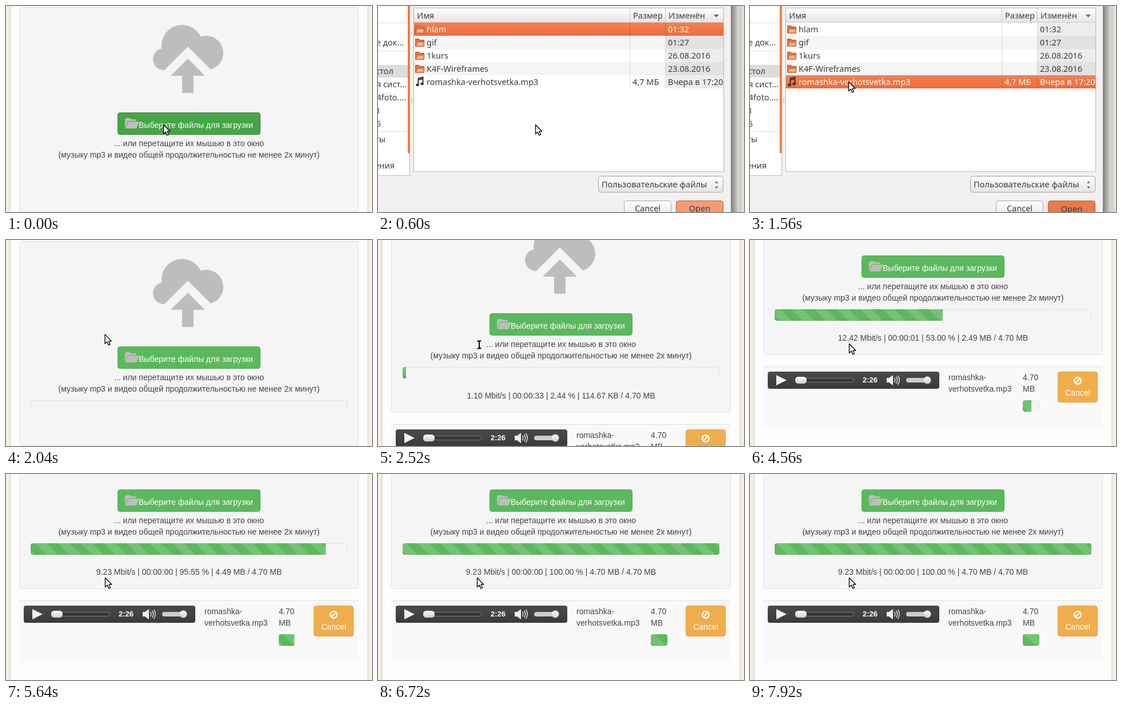
Recreate the animation shown at these times as an HTML page. Size 640x360 px, loop 8000 ms.

```html
<!DOCTYPE html>
<html lang="ru">
<head>
<meta charset="utf-8">
<title>Загрузка файлов</title>
<style>
  html, body { margin: 0; width: 100%; height: 100%; overflow: hidden; background: #f5f0e4; }
  svg { display: block; width: 640px; height: 360px; }
  text { font: 14px "Liberation Sans", Arial, sans-serif; fill: #444; white-space: pre; }
  .mid { text-anchor: middle; }
  .end { text-anchor: end; }
  .white { fill: #fff; }
  #dialog text { font: 14.5px "Noto Sans", sans-serif; fill: #3c3c3c; }
  #dialog .selected text { fill: #fff; }
  .button { fill: url(#face); stroke: #aaa59f; }
</style>
</head>
<body>
<svg viewBox="0 0 640 360">
  <defs>
    <pattern id="stripes" width="40" height="40" patternUnits="userSpaceOnUse">
      <path d="M0 0H20L40 20V40ZM0 20V40H20Z" fill="#fff" fill-opacity=".15"/>
    </pattern>
    <linearGradient id="face" x2="0" y2="1">
      <stop stop-color="#fff"/><stop offset="1" stop-color="#e6e4e2"/>
    </linearGradient>
    <linearGradient id="knob" x2="0" y2="1">
      <stop stop-color="#fff"/><stop offset="1" stop-color="#ccc"/>
    </linearGradient>
    <linearGradient id="orange" x2="0" y2="1">
      <stop stop-color="#f58052"/><stop offset="1" stop-color="#ec6c3c"/>
    </linearGradient>
    <linearGradient id="edge">
      <stop stop-color="#000" stop-opacity=".5"/><stop offset=".6" stop-color="#000" stop-opacity=".14"/>
      <stop offset="1" stop-color="#000" stop-opacity=".04"/>
    </linearGradient>
    <linearGradient id="dark" x2="0" y2="1">
      <stop stop-color="#4a4a4a"/><stop offset="1" stop-color="#3a3a3a"/>
    </linearGradient>
  </defs>

  <rect width="640" height="360" fill="#f5f0e4"/>
  <rect x="5.5" y="-5" width="629" height="370" fill="none" stroke="#ece7dc" stroke-width="2"/>
  <rect x="7.5" y="-5" width="625" height="370" fill="#fdfdfd" stroke="#dad7d0"/>

  <g id="page">
    <rect x="23.5" y="2.5" width="593" height="357" rx="4" fill="#f5f5f5" stroke="#e1e1e1"/>
    <path d="M26 3.5H614" stroke="#ececec"/>
    <g fill="#bdbdbd">
      <circle cx="276" cy="93" r="19"/><circle cx="308" cy="69" r="36"/><circle cx="350" cy="82" r="30"/>
      <path d="M276 112L280 70H345L352 112Z"/>
      <path d="M318 71L275 114H361Z" fill="#f5f5f5"/>
      <path d="M318 92L348 122H328V152H308V122H288Z"/>
    </g>
    <rect id="choose" x="195.5" y="186.5" width="249" height="38" rx="4"/>
    <path d="M208 212V198L210 196H217L219 198H227V201H213L209 212ZM213.500 202H233L228 214H209Z" fill="#bdbdbd"/>
    <text class="white" x="232" y="213">Выберите файлы для загрузки</text>
    <text class="mid" x="320" y="245">... или перетащите их мышью в это окно</text>
    <text class="mid" x="320" y="265">(музыку mp3 и видео общей продолжительностью не менее 2х минут)</text>
    <g id="progress">
      <g id="mainBar"></g>
      <text id="stats" class="mid" x="320" y="335"></text>
    </g>

    <rect x="23" y="380" width="593" height="107" fill="#f9f9f9"/>
    <path d="M23 380.500H616" stroke="#ddd"/>
    <rect x="31" y="389" width="300" height="30" rx="4" fill="url(#dark)"/>
    <path d="M46 395L64 404L46 413Z" fill="#f2f2f2"/>
    <rect x="80.500" y="400.500" width="101" height="7" rx="3.500" fill="#383838" stroke="#777"/>
    <rect x="79" y="398" width="20" height="12" rx="5.500" fill="url(#knob)"/>
    <text class="white" x="197" y="408" style="font-size:13px;font-weight:bold">2:26</text>
    <path d="M239 400H243L250 395V413L243 408H239Z" fill="#eee"/>
    <path d="M252.500 400Q255 404 252.500 408M255.500 398Q260 404 255.500 410M258.500 396Q264 404 258.500 412" fill="none" stroke="#ddd" stroke-width="1.500"/>
    <rect x="273" y="400" width="42" height="8" rx="4" fill="#ccc"/>
    <circle cx="310" cy="404" r="6.500" fill="url(#knob)"/>
    <text x="347" y="404">romashka-</text>
    <text x="347" y="424">verhotsvetka.mp3</text>
    <text x="477" y="404">4.70</text>
    <text x="477" y="424">MB</text>
    <g id="smallBar"></g>
    <rect x="538.500" y="389.500" width="69" height="53" rx="4" fill="#f0ad4e" stroke="#eea236"/>
    <g fill="none" stroke="#fff" stroke-width="2.200"><circle cx="573" cy="405" r="5.800"/><path d="M569 409L577 401"/></g>
    <text class="mid white" x="573" y="431">Cancel</text>
  </g>

  <g id="dialog">
    <rect x="617" width="23" height="360" fill="url(#edge)"/>
    <rect width="617" height="360" fill="#f2f1f0"/>
    <rect x="-5" y="-5" width="60.500" height="301.500" fill="#fff" stroke="#bbb6b0"/>
    <rect y="103" width="52" height="22" fill="#dedcda"/>
    <path d="M0 29.500H52M0 78.500H52M0 219.500H52" stroke="#ddd"/>
    <rect x="52" width="3.500" height="257" fill="#f07746"/>
    <path d="M57 162.500H61M57 165.500H61M57 168.500H61" stroke="#bbb"/>
    <g id="places"></g>

    <rect x="62.500" y="3.500" width="542" height="286" fill="#fff" stroke="#bbb6b0"/>
    <rect x="63" y="4" width="541" height="25" fill="url(#face)"/>
    <path d="M63 28.500H604M440.500 4V28M502.500 4V28" stroke="#cfccc8"/>
    <text x="68" y="22">Имя</text><text x="446" y="22">Размер</text><text x="508" y="22">Изменён</text>
    <path d="M587 15H596L591.500 20Z" fill="#666"/>
    <g id="files"></g>

    <rect class="button" x="385.500" y="297.500" width="218" height="28" rx="4"/>
    <text x="391" y="317">Пользовательские файлы</text>
    <path d="M589 309.500L592 306L595 309.500ZM589 315.500L592 319L595 315.500Z" fill="#666"/>
    <rect class="button" x="430.500" y="340.500" width="82" height="30" rx="4"/>
    <text class="mid" x="471.500" y="359">Cancel</text>
    <rect id="open" x="521.500" y="340.500" width="82" height="30" rx="4" stroke="#c25a33"/>
    <text id="openLabel" class="mid" x="562.500">Open</text>
  </g>

  <g id="cursor" stroke-linejoin="round">
    <path id="arrow" d="M0 0V16L3.800 12.700L6.300 18.500L9 17.300L6.500 11.700H11.500Z" fill="#fff" stroke="#000" stroke-width="1.300"/>
    <path id="hand" d="M4 1Q6-1 7 1V7Q9 6 10 8Q12 7 13 9Q16 8 16 11V15L14 20H6L0 12Q0 9 4 12Z" fill="#fff" stroke="#000" stroke-width="1.200"/>
    <path id="beam" d="M0-5H7M3.500-5V8M0 8H7" fill="none" stroke="#000" stroke-width="2"/>
  </g>
</svg>
<script>
const $ = id => document.getElementById(id);
const LOOP = 8000, STEP = 120;

const updates = [
  { at: 2350, pct: 2.44, rate: '1.10', left: '00:00:33', sent: '114.67 KB' },
  { at: 2960, pct: 18.13, rate: '3.87', left: '00:00:07', sent: '851.86 KB' },
  { at: 3600, pct: 53, rate: '12.42', left: '00:00:01', sent: '2.49 MB' },
  { at: 4750, pct: 76.71, rate: '8.97', left: '00:00:00', sent: '3.61 MB' },
  { at: 5290, pct: 95.55, rate: '9.23', left: '00:00:00', sent: '4.49 MB' },
  { at: 5760, pct: 100, rate: '9.23', left: '00:00:00', sent: '4.70 MB' },
];

const files = [
  ['hlam', '', '01:32'], ['gif', '', '01:27'], ['1kurs', '', '26.08.2016'],
  ['K4F-Wireframes', '', '23.08.2016'],
  ['romashka-verhotsvetka.mp3', '4,7 МБ', 'Вчера в 17:20'],
];
const places = [
  ['е док…', 45, 69], ['стол', 27, 119], ['я сист…', 50, 142], ['4foto.…', 49, 165],
  ['3', 3, 188], ['5', 5, 211], ['ты', 13, 238], ['ения', 29, 284],
];

const folderIcon = y => `<path d="M65.500 ${y + 5.5}h6l1.500 2h7.500v11h-15z" fill="#e8703d" stroke="#b9532a"/>
  <path d="M68 ${y + 10.5}h13l-1 8h-14z" fill="#f6a071" stroke="#c85f33"/><path d="M70 ${y + 14.5}h7" stroke="#fff"/>`;
const noteIcon = y => `<path d="M70.500 ${y + 17}v-11.500l8-2v11.500M70.500 ${y + 8}l8-2" fill="none" stroke="#333" stroke-width="2"/>
  <ellipse cx="69" cy="${y + 17}" rx="2.800" ry="2.200" fill="#333"/><ellipse cx="77" cy="${y + 15}" rx="2.800" ry="2.200" fill="#333"/>`;

function fileRow([name, size, date], i) {
  const y = 29 + i * 23, odd = i % 2;
  return `<g>
    <rect x="63" y="${y}" width="541" height="23" fill="${odd ? '#f5f5f5' : '#fff'}"/>
    <rect x="503" y="${y}" width="101" height="23" fill="${odd ? '#e2e2e2' : '#ededed'}"/>
    <rect class="highlight" x="63" y="${y}" width="541" height="23" fill="url(#orange)"/>
    <path d="M440.500 ${y}v23M502.500 ${y}v23" stroke="#000" stroke-opacity=".13"/>
    ${size ? noteIcon(y) : folderIcon(y)}
    <text x="85" y="${y + 17}">${name}</text><text x="445" y="${y + 17}">${size}</text>
    <text x="507" y="${y + 17}">${date}</text></g>`;
}

function buildBar(id, x, y, width) {
  $(id).setAttribute('transform', `translate(${x} ${y})`);
  $(id).innerHTML = `<clipPath id="${id}Clip"><rect width="${width}" height="20" rx="4"/></clipPath>
    <g clip-path="url(#${id}Clip)"><rect width="${width}" height="20" fill="#f5f5f5"/>
    <rect x=".5" y=".5" width="${width - 1}" height="25" rx="4" fill="none" stroke="#e3e3e3"/>
    <rect class="fill" height="20" fill="#5cb85c"/><rect class="fill" height="20" fill="url(#stripes)"/>
    <rect class="fill" y="19" height="1" fill-opacity=".15"/></g>`;
  const fills = $(id).querySelectorAll('.fill');
  return pct => fills.forEach(f => f.setAttribute('width', Math.round(width * pct / 100)));
}

$('files').innerHTML = files.map(fileRow).join('');
$('places').innerHTML = places.map(([s, x, y]) => `<text class="end" x="${x}" y="${y}">${s}</text>`).join('');
const setMainBar = buildBar('mainBar', 43, 280, 554);
const setSmallBar = buildBar('smallBar', 477, 439, 29);

// CSS "ease": cubic-bezier(.25, .1, .25, 1), solved by bisection
function ease(x) {
  if (x <= 0 || x >= 1) return x <= 0 ? 0 : 1;
  const bezier = (a, b, s) => 3 * a * s * (1 - s) ** 2 + 3 * b * s * s * (1 - s) + s ** 3;
  let lo = 0, hi = 1;
  for (let i = 0; i < 20; i++) {
    const s = (lo + hi) / 2;
    if (bezier(.25, .25, s) < x) lo = s; else hi = s;
  }
  return bezier(.1, 1, lo);
}

// Linear interpolation through [time, value] points
function track(t, points) {
  const i = points.findIndex(p => p[0] > t);
  if (i < 0) return points[points.length - 1][1];
  if (!i) return points[0][1];
  const [t0, v0] = points[i - 1], [t1, v1] = points[i];
  return v0 + (v1 - v0) * (t - t0) / (t1 - t0);
}

const show = (id, on) => $(id).style.display = on ? '' : 'none';

function drawCursor(t) {
  const x = track(t, [[720, 275], [840, 246], [960, 197], [1080, 172], [1920, 172], [2160, 173]]);
  const y = track(t, [[720, 207], [840, 186], [960, 151], [1080, 132], [1800, 132], [2160, 181]]);
  const hand = t >= 120 && t < 360, beam = t >= 2520 && t < 2640;
  show('hand', hand);
  show('beam', beam);
  show('arrow', !hand && !beam);
  $('cursor').setAttribute('transform', `translate(${x + .5} ${y + .5})`);
}

function drawDialog(t) {
  const opacity = track(t, [[240, 0], [360, .4], [480, .8], [600, 1], [1680, 1], [1800, .6], [1920, .2], [2040, 0]]);
  $('dialog').style.opacity = opacity;
  show('dialog', opacity > 0);
  const selected = t < 1320 ? 0 : 4;
  [...$('files').children].forEach((row, i) => {
    row.classList.toggle('selected', i === selected);
    row.querySelector('.highlight').style.display = i === selected ? '' : 'none';
  });
  const pressed = t >= 1560;
  $('open').setAttribute('fill', pressed ? '#e87a50' : '#f59a76');
  $('openLabel').setAttribute('y', pressed ? 360 : 359);
}

function drawPage(t) {
  const scroll = track(t, [[2400, 0], [2520, 58], [2640, 108], [2760, 159]]);
  $('page').setAttribute('transform', `translate(0 ${-scroll})`);
  const hover = t < 360;
  $('choose').setAttribute('fill', hover ? '#47a447' : '#5cb85c');
  $('choose').setAttribute('stroke', hover ? '#398439' : '#4cae4c');

  show('progress', t >= 2040);
  const done = updates.filter(u => u.at <= t);
  const pct = done.reduce((sum, u, i) =>
    sum + (u.pct - (i ? done[i - 1].pct : 0)) * ease((t - u.at) / 600), 0);
  setMainBar(pct);
  setSmallBar(pct);
  const last = done[done.length - 1];
  $('stats').textContent = last
    ? `${last.rate} Mbit/s | ${last.left} | ${last.pct.toFixed(2)} % | ${last.sent} / 4.70 MB` : '';
  const shift = 40 - Math.max(0, t - 2040) % 2000 / 50;
  $('stripes').setAttribute('patternTransform', `translate(${shift} 0)`);
}

function render(now) {
  const t = Math.floor(now % LOOP / STEP) * STEP;
  drawPage(t);
  drawDialog(t);
  drawCursor(t);
}

let start;
function tick(now) {
  start ??= now;
  render(now - start);
  requestAnimationFrame(tick);
}
render(0);
requestAnimationFrame(tick);
</script>
</body>
</html>
```
